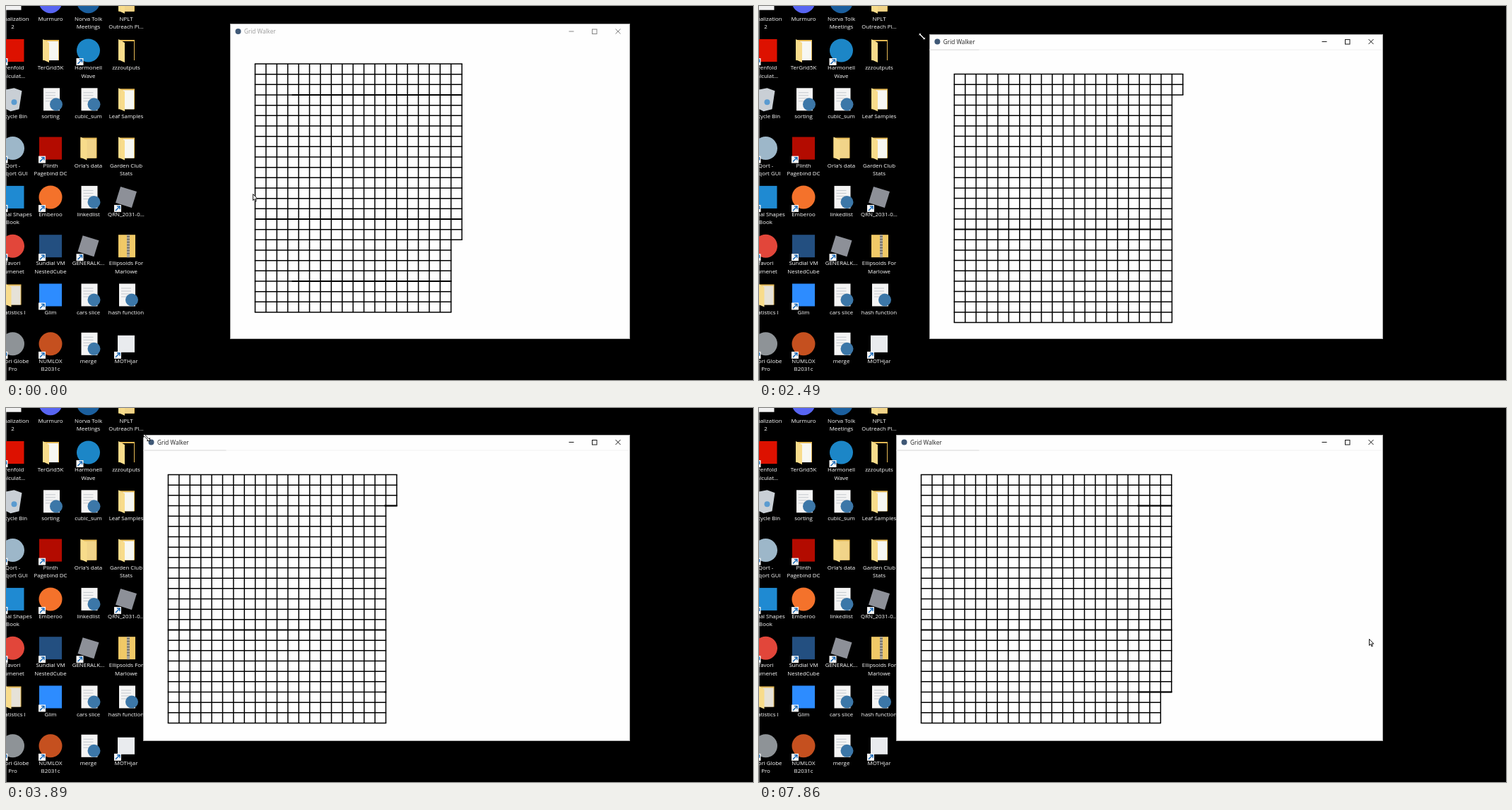
These frames come from a looping animation (1057 px wide and 530 px high, 8 s). An HTML page with a canvas:

```html
<!DOCTYPE html>
<html lang="en">
<head>
<meta charset="utf-8">
<title>Grid Walker</title>
<style>
html, body { margin: 0; width: 100%; height: 100%; overflow: hidden; background: #000; }
canvas { display: block; }
</style>
</head>
<body>
<canvas id="stage" width="1057" height="530"></canvas>
<script>
const g = document.getElementById('stage').getContext('2d');
const LOOP = 8000, ROWS = 24, CELL_W = 15.4, CELL_H = 352 / ROWS;
const RIGHT = 883, BOTTOM = 472;
const PRESS = 2050, RELEASE = 3890; // the window corner is dragged in between
const FONT = '"Open Sans", "Noto Sans", sans-serif';

// Key points: time, x, y
const corner = [[PRESS, 317.5, 25.5], [2606, 215.5, 45], [2747, 198, 45], [3311, 197.5, 43.5],
  [RELEASE - 1, 197.5, 43.5], [RELEASE, 194.5, 38]];
const pointer = [[0, 349, 266], [930, 298, 27], [1760, 321, 29], [PRESS, 321, 29], [2606, 200, 48],
  [3311, 197, 40], [RELEASE, 199, 42], [4300, 190, 42], [4840, 198, 42], [5528, 223, 48],
  [5960, 373, 160], [7050, 516, 270], [7848, 863, 327]];

function at(keys, t) {
  const i = keys.findIndex(k => k[0] > t);
  if (i < 0) return keys[keys.length - 1].slice(1);
  if (i === 0) return keys[0].slice(1);
  const a = keys[i - 1], b = keys[i], f = (t - a[0]) / (b[0] - a[0]);
  return [a[1] + (b[1] - a[1]) * f, a[2] + (b[2] - a[2]) * f];
}

// The picture refreshes at a steady rate, a little slower before the release
function refreshTime(t) {
  const [start, step] = t < RELEASE ? [68, 141] : [RELEASE, 136.5];
  return Math.max(0, start + Math.floor((t - start) / step) * step);
}

// Cells are added one by one and wait while the window is dragged
function cellCount(t) {
  return Math.floor(t < RELEASE ? Math.min(482, 449 + t / 62) : 483 + (t - RELEASE) / 59.9);
}

function rect(x, y, w, h, color) {
  g.fillStyle = color;
  g.fillRect(x, y, w, h);
}

function disc(x, y, r, color) {
  g.fillStyle = color;
  g.beginPath();
  g.arc(x, y, r, 0, 7);
  g.fill();
}

function line(x1, y1, x2, y2, color, width = 1) {
  g.strokeStyle = color;
  g.lineWidth = width;
  g.beginPath();
  g.moveTo(x1, y1);
  g.lineTo(x2, y2);
  g.stroke();
}

function text(s, x, y, size, color, align = 'left') {
  g.font = `${size}px ${FONT}`;
  g.textAlign = align;
  g.fillStyle = color;
  g.fillText(s, x, y);
}

// Icons are drawn around their own centre
const flap = new Path2D('M-11-16 -2-11V17L-11 13Z');
const bucket = new Path2D('M-14-13 2-16 13-12 9 14 -3 17 -11 13Z');
const icons = {
  disc: c => disc(0, 0, 16.5, c),
  box: c => rect(-16, -16, 32, 32, c),
  small: c => rect(-12, -12, 24, 24, c),
  tilt(c) {
    g.rotate(.3);
    rect(-12, -12, 24, 24, c);
    g.rotate(-.3);
  },
  page(c) {
    rect(-10, -16, 23, 32, '#f4f4f4');
    for (let y = -10; y < 4; y += 4) rect(-7, y, 14, 1, '#c3c8ce');
    disc(8, 7, 9, c);
  },
  folder(c) {
    rect(-11, -15, 23, 29, '#e5b954');
    rect(-5, -13, 16, 27, c);
    g.fillStyle = '#f8dc8b';
    g.fill(flap);
  },
  zip() {
    rect(-11, -16, 24, 32, '#f0c967');
    rect(1, -16, 4, 32, '#a9a59a');
    for (let y = -14; y < 14; y += 4) rect(1, y, 4, 1, '#55534e');
  },
  bin() {
    g.fillStyle = '#c9cfd5';
    g.fill(bucket);
    disc(2, 4, 4, '#5b9bd0');
  }
};

// One line per column, each entry: icon, colour, label lines
const desktop = [
  ['small #f2f2f2 Visualization|2', 'box #dd1100 Brenfold|Calculat...', 'bin - Recycle Bin',
    'disc #9db7c9 Qort -|Zelqort GUI', 'box #1f8ad2 Formal Shapes|Book', 'disc #e2463a Tavori|Lumenet',
    'folder #e6e2d8 Statistics I', 'disc #8e9397 Tavori Globe|Pro'],
  ['disc #5865f2 Murmuro', 'folder #f7f7f2 TerGrid5K', 'page #3c77a8 sorting',
    'box #b30b00 Plinth|Pagebind DC', 'disc #f4722b Emberoo', 'box #234f80 Sundial VM|NestedCube',
    'box #2d8cff Glim', 'disc #c5501f NUMLOX|B2031c'],
  ['disc #1b5f9e Norva Tolk|Meetings', 'disc #1c86c7 Harmonell|Wave', 'page #3c77a8 cubic_sum',
    "folder #f1d489 Orla's data", 'page #3c77a8 linkedlist', 'tilt #8d9098 GENERALK...',
    'page #3c77a8 cars slice', 'page #3c77a8 merge'],
  ['folder #f1d489 NPLT|Outreach Pl...', 'folder #000 zzzoutputs', 'folder #f7f7f2 Leaf Samples',
    'folder #f7f7f2 Garden Club|Stats', 'tilt #8d9098 QRN_2031-0...', 'zip - Ellipsoids For|Marlowe',
    'page #3c77a8 hash function', 'small #e9ebee MOTHjar']
];

function drawShortcut() {
  rect(-17, 11, 10, 10, '#f5f5f5');
  line(-15, 19, -9, 13, '#1668b8', 1.4);
  line(-13, 13, -8.5, 13, '#1668b8', 1.4);
  line(-9, 13, -9, 17, '#1668b8', 1.4);
}

function drawDesktop() {
  rect(0, 0, 1057, 530, '#000');
  rect(0, 0, 1, 530, '#666');
  desktop.forEach((column, c) => column.forEach((entry, r) => {
    const [, kind, color, label] = entry.match(/(\S+) (\S+) (.+)/);
    g.save();
    g.translate(9.5 + c * 53.5, 63 + (r - 1) * 69.3);
    icons[kind](color);
    if (r && /disc|box|tilt|small/.test(kind)) drawShortcut();
    label.split('|').forEach((s, i) => text(s, 0, 27 + i * 11.5, 7.9, '#fff', 'center'));
    g.restore();
  }));
}

function drawGrid(x, y, t) {
  const n = cellCount(t), full = Math.floor(n / ROWS), rest = n % ROWS;
  const reach = r => CELL_W * (full + (rest && r <= rest ? 1 : 0));
  const row = (r, from, width) =>
    line(x + from, y + r * CELL_H, x + reach(r) + .7, y + r * CELL_H, '#000', width);
  for (let r = 0; r <= ROWS; r++) row(r, -.7, r === 15 ? 2.1 : 1.5);
  for (let c = 0; c <= full + (rest ? 1 : 0); c++)
    line(x + c * CELL_W, y, x + c * CELL_W, y + CELL_H * (c > full ? rest : ROWS), '#000', 1.5);

  // Two rows are heavier where cells were added since the last repaint
  if (t >= PRESS && t < RELEASE) return;
  const start = t < PRESS ? 52 : 306;
  for (const r of [3, 21]) if (start < reach(r)) row(r, start, 2.1);
}

function drawWindow(x, y, t) {
  const active = t >= PRESS, ink = active ? '#1a1a1a' : '#858585';
  const left = Math.floor(x), top = Math.floor(y), mid = y + 10.5;
  rect(left, top, RIGHT - left, BOTTOM - top, '#b0b0b0');
  rect(left + 1, top + 1, RIGHT - left - 2, BOTTOM - top - 2, '#fefefe');
  if (active) {
    line(x, y + 22, RIGHT - 1, y + 22, '#f1f1f1');
    line(x, y + 22, 311.5, y + 22, '#dcdcdc');
  } else if (t >= 900) line(x, y + 22, 662, y + 22, '#e4e4e4');

  disc(x + 11, mid, 4, '#3f5876');
  text('Grid Walker', x + 19.5, y + 13.5, 8.2, active ? '#222' : '#999');
  line(796.5, mid, 803.5, mid, ink);
  g.strokeRect(829.5, mid - 3, 6.5, 6.5);
  for (const s of [-1, 1]) line(862.5, mid - 3.5 * s, 869.5, mid + 3.5 * s, ink);
  drawGrid(x + 35, y + 56.5, t);
}

const arrow = new Path2D('M.5 .5V9.5L2.5 7.6 4 11 5.3 10.4 3.9 7.1H6.8Z');
const resize = new Path2D('M-4.5-4.5H-.5L-1.8-3.2 3.2 1.8 4.5 .5V4.5H.5L1.8 3.2 -3.2-1.8 -4.5-.5Z');

function drawPointer(x, y, nearCorner) {
  const path = nearCorner ? resize : arrow;
  g.save();
  g.translate(x, y);
  g.fillStyle = '#fff';
  g.strokeStyle = '#000';
  g.lineWidth = .9;
  g.fill(path);
  g.stroke(path);
  g.restore();
}

function frame(now) {
  const t = refreshTime(now % LOOP);
  const [wx, wy] = at(corner, t), [px, py] = at(pointer, t);
  drawDesktop();
  drawWindow(wx, wy, t);
  drawPointer(px, py, Math.hypot(px - wx, py - wy) < 18);
  requestAnimationFrame(frame);
}
requestAnimationFrame(frame);
</script>
</body>
</html>
```
